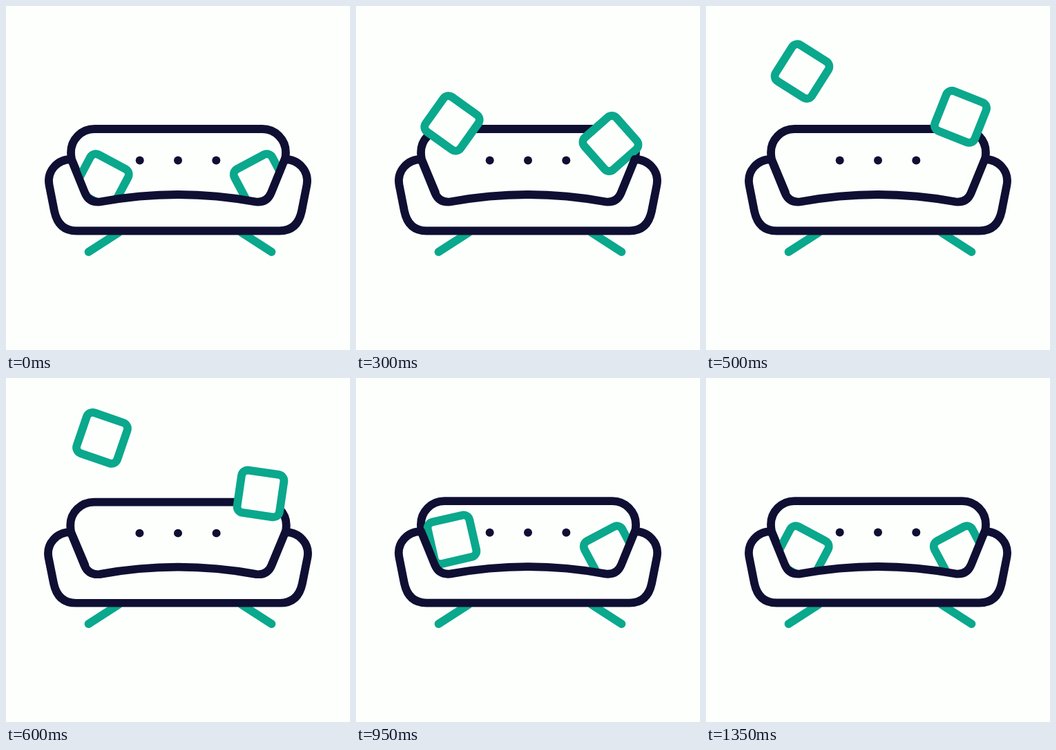
Animation of 498 by 498 pixels, one loop 1.4 s. Source, as an HTML page:

```html
<!DOCTYPE html>
<html lang="en">
<head>
<meta charset="utf-8">
<title>Bouncing sofa</title>
<style>
  html, body { margin: 0; width: 100%; height: 100%; overflow: hidden; background: #fdfffc; }
  svg { display: block; width: 100vw; height: 100vh; }
  .navy { stroke: #0f0f33; }
  .green { stroke: #0aa88c; }
  .solid { fill: #fdfffc; }
</style>
</head>
<body>
<svg viewBox="0 0 498 498" fill="none" stroke-width="11.8" stroke-linecap="round" stroke-linejoin="round">
  <path class="green" d="M119.5 356L163 328M384.5 356L341 328"/>
  <g class="sofa">
    <path class="navy solid" d="M115 270L95 222Q94 217 94 212A34 34 0 0 1 128 178H371A34 34 0 0 1 405 212Q405 217 404 222L384 270"/>
    <g fill="#0f0f33">
      <circle cx="193.7" cy="223.5" r="6"/>
      <circle cx="249" cy="223.5" r="6"/>
      <circle cx="304.3" cy="223.5" r="6"/>
    </g>
  </g>
  <rect id="left" class="green solid" x="-31" y="-31" width="62" height="62" rx="9"/>
  <rect id="right" class="green solid" x="-31" y="-31" width="62" height="62" rx="9"/>
  <g class="sofa">
    <path class="navy solid" d="M94.5 222L114 270Q120 285 136 283.5Q193 273 249 273Q305 273 362 283.5Q378 285 384 270L403.5 222
      C424 222 439 239 435.5 259L428 297Q422 325.5 396 325.5H102Q76 325.5 70 297L62.5 259C59 239 74 222 94.5 222Z"/>
  </g>
</svg>
<script>
  const LOOP = 1400, STEP = 50, LAUNCH = 200, SEAT = 253;

  const cushions = [
    { id: 'left', x: 139, peak: 86.5, top: 650, land: 969, rise: 2.75,
      angle: 28, wind: 7.5, spin: 180, from: 430, to: 1040, power: 1.9 },
    { id: 'right', x: 368.5, peak: 160.3, top: 505, land: 848, rise: 2.2,
      angle: 62, wind: 0, spin: 90, from: LAUNCH, to: 870, power: 1 }
  ];
  const sofa = document.querySelectorAll('.sofa');

  const progress = (t, a, b) => Math.min(1, Math.max(0, (t - a) / (b - a)));

  // The sofa sinks before the launch, then rings out.
  function squash(t) {
    const s = t - LAUNCH;
    const wave = s < 0
      ? Math.sin(Math.PI * t / (2 * LAUNCH)) ** 2
      : Math.cos(Math.PI * s / 200) * Math.exp(-s / 220);
    return -0.053 * wave;
  }

  function height(c, t) {
    return t < c.top
      ? 1 - (1 - progress(t, LAUNCH, c.top)) ** c.rise
      : 1 - progress(t, c.top, c.land) ** 2;
  }

  function turn(c, t) {
    const wind = c.wind * Math.sin(Math.PI / 2 * progress(t, 0, LAUNCH));
    return c.angle + wind - (c.spin + c.wind) * progress(t, c.from, c.to) ** c.power;
  }

  function draw(t) {
    const q = squash(t), rest = SEAT - 55 * q;
    const scale = `translate(249 356) scale(${1 - 0.6 * q} ${1 + q}) translate(-249 -356)`;
    sofa.forEach(g => g.setAttribute('transform', scale));
    for (const c of cushions) {
      const y = rest + (c.peak - rest) * height(c, t);
      document.getElementById(c.id)
        .setAttribute('transform', `translate(${c.x} ${y}) rotate(${turn(c, t)})`);
    }
  }

  let start;
  function frame(now) {
    start ??= now;
    draw(Math.floor(((now - start) % LOOP) / STEP) * STEP);
    requestAnimationFrame(frame);
  }
  draw(0);
  requestAnimationFrame(frame);
</script>
</body>
</html>
```
